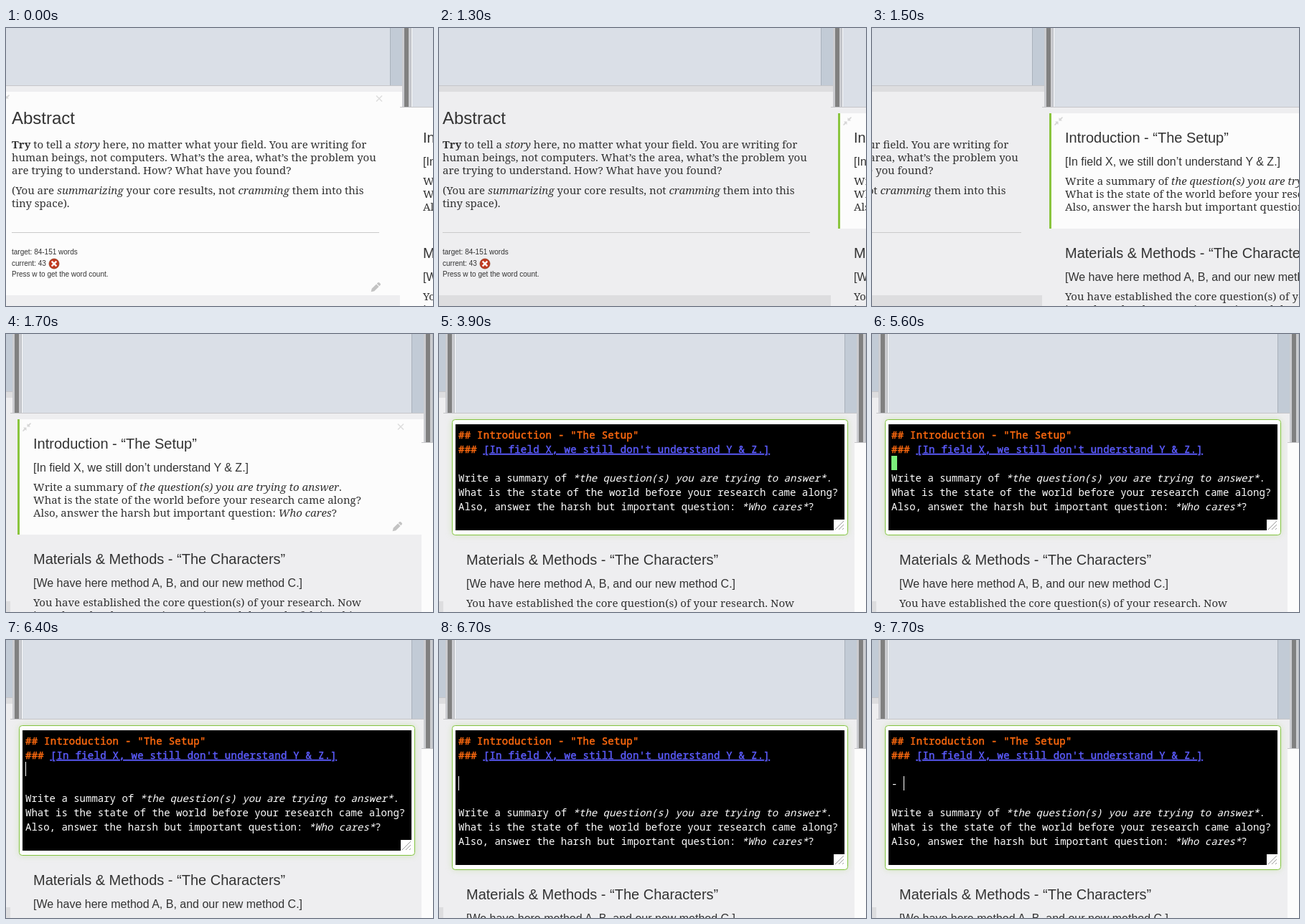
An HTML page that plays this animation: 595 px wide and 388 px high, repeating every 8 s.

```html
<!DOCTYPE html>
<html lang="en">
<head>
<meta charset="utf-8">
<title>Writing cards</title>
<style>
  html, body { margin: 0; width: 100%; height: 100%; overflow: hidden; background: #fcfcfc; }
  svg { display: block; width: 595px; height: 388px; }
  text { white-space: pre; fill: #333; }
  .sans { font-family: "Liberation Sans", Arial, sans-serif; }
  .serif { font: 15px "Noto Serif", serif; }
  .mono { font: 14px "Noto Sans Mono", monospace; fill: #fff; }
  .head { letter-spacing: .28px; stroke-width: .45px; }
  .orange { fill: #ff6a0f; stroke: #ff6a0f; }
  .blue { fill: #5c5cff; stroke: #5c5cff; }
  .i { font-style: italic; }
  .b { font-weight: bold; }
</style>
</head>
<body>
<svg id="stage" viewBox="0 0 595 388"></svg>
<script>
const LOOP = 8000, SCROLL = 543, ROW = 20;
const WHITE = '#fcfcfc', PALE = '#eeeef0', GREY = '#dddddf', SKY = '#dadfe7', SHADE = '#c2cbd6';

const rect = (x, y, w, h, fill, extra = '') =>
  `<rect x="${x}" y="${y}" width="${w}" height="${h}" fill="${fill}" ${extra}/>`;
const line = (d, color, width = 1) =>
  `<path d="${d}" stroke="${color}" stroke-width="${width}" fill="none"/>`;
const group = (id, body) => `<g id="${id}">${body}</g>`;

// *x* is italic, **x** is bold
const rich = s => s
  .replace(/\*\*(.+?)\*\*/g, '<tspan class="b">$1</tspan>')
  .replace(/\*(.+?)\*/g, '<tspan class="i">$1</tspan>');
const sans = (x, y, size, s) => `<text class="sans" x="${x}" y="${y}" font-size="${size}">${s}</text>`;
const serif = (x, y, s) => `<text class="serif" x="${x}" y="${y}">${rich(s)}</text>`;
const rowBase = row => 146 + ROW * row;
const mono = (row, s, cls = '') => `<text class="mono ${cls}" x="27" y="${rowBase(row)}">${s}</text>`;

const scrollbar = x =>
  rect(x, 0, 13, 388, '#cbccd0') + rect(x + 3, 0, 6, 388, '#808080') + rect(x + 12, 0, 1, 388, '#b4b9c0');

const spacer = (x, bottom) =>
  rect(x, 0, 543, bottom, SKY) + rect(x + 542, 0, 17, bottom, SHADE) + rect(x + 542, 0, 1, bottom, '#a9b1bb');

const topRule = (x, y, w) => rect(x, y, w, 1, '#c6c6c9');

const cross = (x, y) => line(`M${x - 4} ${y - 4}l8 8m0-8l-8 8`, '#dcdcdc', 1.4);
const shrink = (x, y) =>
  `<g fill="#d6d6d6" transform="translate(${x} ${y})">
    <path d="M.5-.5V-5L2-3.500 5-6 6-5 3.500-2 5-.5Z"/><path d="M-.5 .5V5L-2 3.500-5 6-6 5-3.500 2-5 .5Z"/></g>`;
const pencil = (x, y) =>
  `<path transform="translate(${x} ${y}) rotate(-45)" fill="#c3c3c3"
    d="M-9 0L-5-2.500H4V2.500H-5ZM5-2.500H7Q8.500-2.500 8.500 0T7 2.500H5Z"/>`;
const tools = (x, top, bottom) => shrink(x, top) + cross(x + 521, top - .5) + pencil(x + 516, bottom);

const errorIcon = (x, y) =>
  `<circle cx="${x}" cy="${y}" r="7" fill="#c23a20" stroke="#8c3d22" stroke-width=".8"/>` +
  line(`M${x - 3.3} ${y - 3.3}l6.600 6.600m0-6.600l-6.600 6.600`, '#fff', 2.4);

const abstract =
  sans(8, 134, 24, 'Abstract') +
  serif(8, 168, '**Try** to tell a *story* here, no matter what your field. You are writing for') +
  serif(8, 186, 'human beings, not computers. What’s the area, what’s the problem you') +
  serif(8, 204, 'are trying to understand. How? What have you found?') +
  serif(8, 232, '(You are *summarizing* your core results, not *cramming* them into this') +
  serif(8, 250, 'tiny space).') +
  rect(8, 285, 512, 1, '#cacaca') +
  sans(8, 316, 10, 'target: 84-151 words') +
  sans(8, 332, 10, 'current: 43') + errorIcon(67, 329) +
  sans(8, 347, 10, 'Press w to get the word count.');

const intro =
  sans(581, 160, 20, 'Introduction - “The Setup”') +
  sans(581, 192, 16, '[In field X, we still don’t understand Y &amp; Z.]') +
  serif(581, 219, 'Write a summary of *the question(s) you are trying to answer*.') +
  serif(581, 237, 'What is the state of the world before your research came along?') +
  serif(581, 255, 'Also, answer the harsh but important question: *Who cares*?');

const materials =
  sans(581, 321, 20, 'Materials &amp; Methods - “The Characters”') +
  sans(581, 353, 16, '[We have here method A, B, and our new method C.]') +
  serif(581, 380, 'You have established the core question(s) of your research. Now') +
  serif(581, 398, 'introduce the characters in question and the work of doing this');

const columnOne =
  spacer(-7, 80) + topRule(0, 80, 552) + scrollbar(552) +
  '<rect id="oneGroup" x="0" y="81" width="552" height="307"/>' +
  '<rect id="oneCard" x="0" y="89" width="552" height="284"/>' +
  abstract + group('oneTools', tools(-1, 99, 362));

const columnTwo =
  scrollbar(1125) + spacer(566, 110) + topRule(549, 110, 576) +
  '<rect id="twoGroup" x="549" y="111" width="576" height="277"/>' +
  group('twoCard', rect(559, 119, 566, 161, WHITE) + rect(559, 119, 3, 161, '#8ac53e') + tools(572, 130, 269)) +
  group('intro', intro) + group('materials', materials) +
  topRule(1122, 151, 40) + rect(1122, 152, 40, 236, WHITE);

const star = s => `<tspan class="i">*${s}*</tspan>`;
const editor =
  `<rect id="frame" x="18.5" y="119.5" width="551" rx="4" fill="#fff" stroke="#83c341"
    style="filter:drop-shadow(0 0 4px rgba(150,205,75,.3))"/>` +
  '<rect id="area" x="23" y="126" width="542" fill="#000"/>' +
  '<rect id="block" x="27" width="8" height="20" fill="#7cf07c"/>' +
  mono(0, '## Introduction - "The Setup"', 'head orange') +
  mono(1, '### <tspan class="blue" text-decoration="underline">[In field X, we still don\'t understand Y &amp; Z.]</tspan>', 'head orange') +
  group('body',
    mono(3, `Write a summary of ${star('the question(s) you are trying to answer')}.`) +
    mono(4, 'What is the state of the world before your research came along?') +
    mono(5, `Also, answer the harsh but important question: ${star('Who cares')}?`)) +
  '<text id="covered" class="mono" x="27" style="fill:#000"></text>' +
  group('dash', mono(3, '-')) +
  '<rect id="caret" width="1" height="20" fill="#fff"/>' +
  group('grip', rect(550, 259, 15, 15, '#fff') + line('M552 273L564 261M557 273L564 266M562 273L564 271', '#999'));

const stage = document.getElementById('stage');
stage.innerHTML = group('world', columnOne + columnTwo) + group('editor', editor);
const el = {};
stage.querySelectorAll('[id]').forEach(n => el[n.id] = n);

const set = (id, attrs) => { for (const k in attrs) el[id].setAttribute(k, attrs[k]); };
const show = (id, on) => set(id, { display: on ? 'inline' : 'none' });
const moveY = (id, y) => set(id, { transform: `translate(0 ${y})` });

function scrollAt(t) {
  if (t < 1300) return 0;
  const step = Math.floor((t - 1300) / 100) * 100;
  const p = Math.min(1, (step + 19) / 400);
  return Math.round(SCROLL * (.5 - Math.cos(Math.PI * p) / 2));
}

// block cursor walks up the lines
const blockRow = t =>
  t < 4800 || t >= 6000 ? -1 : t < 5200 ? 5 : t < 5400 ? 4 : t < 5600 ? 3 : t < 5800 ? 2 : 1;

function caretAt(t) {
  if (t < 6000 || (t >= 7200 && t < 7700)) return null;
  if (t < 6300) return [460, 1];
  if (t < 6700) return [27, 2];
  return [t < 7700 ? 27 : 44, 3];
}

function draw(t) {
  const moved = t >= 1300, editing = t >= 3900;
  const grow = t < 6300 ? 0 : t < 6700 ? ROW : 2 * ROW;

  set('world', { transform: `translate(${-scrollAt(t)} 0)` });
  set('oneGroup', { fill: moved ? GREY : PALE });
  set('oneCard', { fill: moved ? PALE : WHITE });
  set('twoGroup', { fill: moved ? PALE : WHITE });
  show('oneTools', !moved);
  show('twoCard', moved && !editing);
  show('intro', !editing);
  moveY('materials', editing ? 1 + grow : 0);

  show('editor', editing);
  set('frame', { height: 161 + grow });
  set('area', { height: 148 + grow });
  moveY('body', grow);
  moveY('grip', grow);
  show('dash', t >= 7700);

  const row = blockRow(t);
  show('block', row >= 0);
  show('covered', row >= 0);
  if (row >= 0) {
    set('block', { y: 130 + ROW * row });
    set('covered', { y: rowBase(row) });
    el.covered.textContent = ['', '#', '', 'W', 'W', 'A'][row];
  }

  const caret = caretAt(t);
  show('caret', caret);
  if (caret) set('caret', { x: caret[0], y: 130 + ROW * caret[1] });
}

const start = performance.now();
function tick() {
  draw((performance.now() - start) % LOOP);
  requestAnimationFrame(tick);
}
tick();
</script>
</body>
</html>
```
